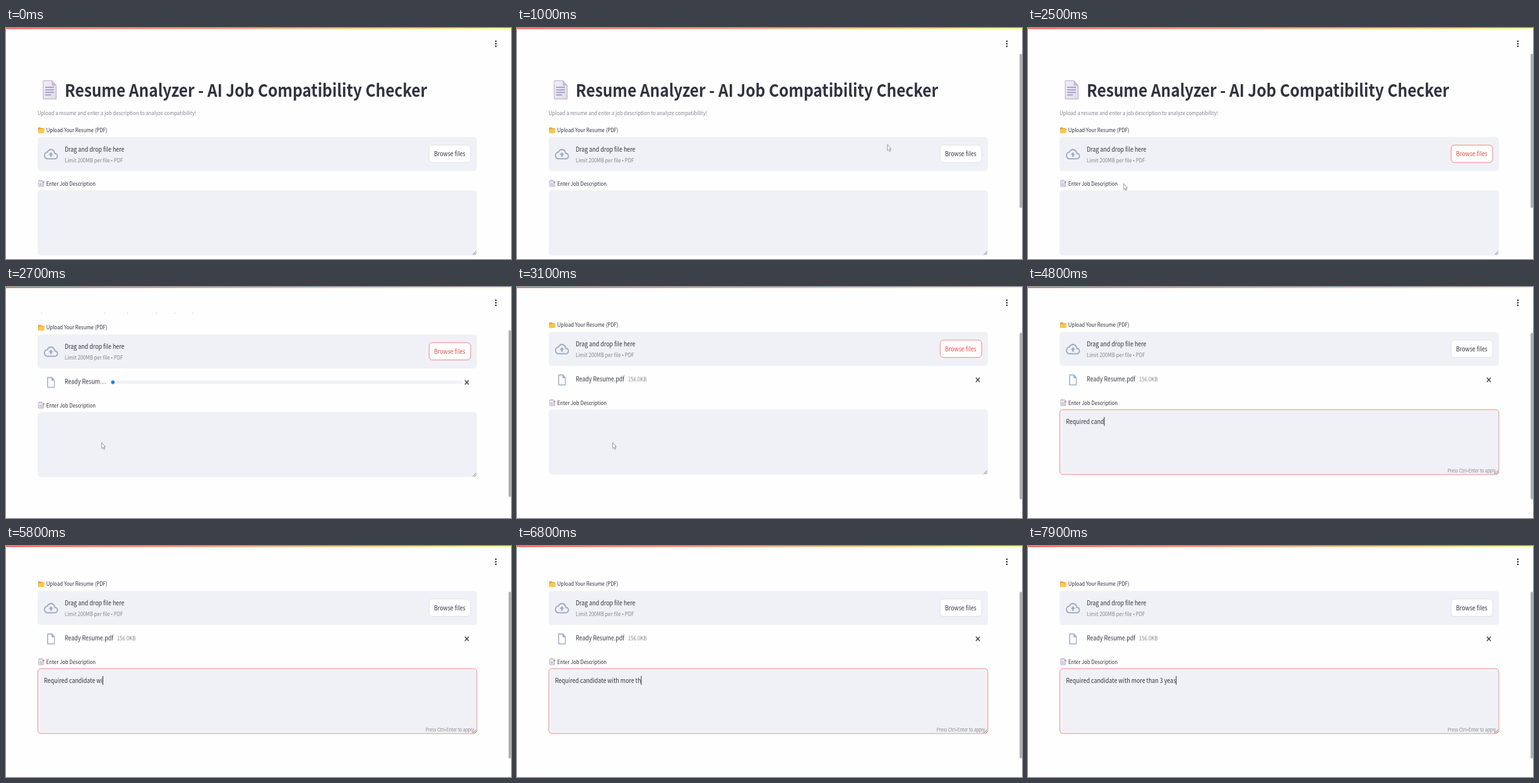
An HTML page that plays this animation: 800 px wide and 366 px high, repeating every 8000 ms.

```html
<!DOCTYPE html>
<html lang="en">
<head>
<meta charset="utf-8">
<title>Resume Analyzer</title>
<style>
  html, body { margin: 0; width: 100%; height: 100%; overflow: hidden; background: #fefefe; }
  svg { display: block; width: 800px; height: 366px; }

  /* The page is shown at 62.2% of its width and 69.5% of its height. */
  text {
    scale: .622 .695;
    font: 14.32px "Noto Sans CJK JP", "Noto Sans CJK SC", "Noto Sans CJK", "Noto Sans", sans-serif;
    fill: #31333f;
    white-space: pre;
  }
  .title { font-size: 39.4px; font-weight: 700; }
  .label { font-size: 12.53px; }
  .muted { font-size: 12.53px; fill: #85868e; }
  .hint { font-size: 10.74px; fill: #85868e; }

  .panel { fill: #f0f1f6; }
  .icon { fill: #9eadc6; }
  .button rect { fill: #fff; stroke: #d8d8dc; stroke-width: .7; }

  .scroll, .lower, .bar, .file, .progress, .done, .button rect, .button text,
  .focus, .caret, .hint, .pointer { animation: 8s step-end infinite; }

  .scroll { animation-name: scroll; }
  @keyframes scroll {
    0% { transform: translateY(0); }
    32.5% { transform: translateY(-71px); }
    33.75% { transform: translateY(-97.5px); }
    35%, 100% { transform: translateY(-101.5px); }
  }
  .lower { animation-name: push; }
  @keyframes push {
    0% { transform: translateY(0); }
    32.5%, 100% { transform: translateY(38.5px); }
  }
  .bar { animation-name: bar; }
  @keyframes bar {
    0% { opacity: 0; y: 41px; height: 244px; }
    1.25% { opacity: 1; y: 41px; height: 244px; }
    32.5% { opacity: 1; y: 61px; height: 264px; }
    33.75% { opacity: 1; y: 68.5px; height: 264px; }
    35%, 100% { opacity: 1; y: 72.5px; height: 264px; }
  }
  .file { animation-name: file; }
  @keyframes file { 0% { opacity: 0; } 32.5%, 100% { opacity: 1; } }
  .progress { animation-name: progress; }
  @keyframes progress { 0% { opacity: 1; } 35%, 100% { opacity: 0; } }
  .done { animation-name: done; }
  @keyframes done { 0% { opacity: 0; } 35%, 100% { opacity: 1; } }

  .button rect { animation-name: hot-edge; }
  @keyframes hot-edge { 15% { stroke: #ff4b4b; } 41.25% { stroke: #d8d8dc; } 0%, 100% { stroke: #d8d8dc; } }
  .button text { animation-name: hot-text; }
  @keyframes hot-text { 15% { fill: #f04848; } 41.25% { fill: #31333f; } 0%, 100% { fill: #31333f; } }

  .focus, .caret { animation-name: focus; }
  @keyframes focus { 0% { opacity: 0; } 41.25%, 100% { opacity: 1; } }
  .hint { animation-name: hint; }
  @keyframes hint { 0% { opacity: 0; } 45%, 100% { opacity: 1; } }

  .pointer { animation-name: pointer, pointer-seen; }
  @keyframes pointer {
    0% { transform: translate(668px, 31px); animation-timing-function: steps(5); }
    6.25% { transform: translate(527px, 176px); }
    11.25% { transform: translate(527px, 176px); animation-timing-function: steps(3); }
    15% { transform: translate(705px, 201px); }
    16.25% { transform: translate(705px, 201px); animation-timing-function: steps(9); }
    27.5% { transform: translate(200px, 150px); animation-timing-function: steps(3); }
    31.25%, 100% { transform: translate(151px, 246px); }
  }
  @keyframes pointer-seen { 0% { opacity: 0; } 1.25% { opacity: 1; } 40%, 100% { opacity: 0; } }
</style>
</head>
<body>
<svg viewBox="0 0 800 366">
  <defs>
    <linearGradient id="rainbow"><stop stop-color="#ff4b4b"/><stop offset="1" stop-color="#fffd80"/></linearGradient>
    <linearGradient id="paper" x2="1" y2="1"><stop stop-color="#f3eef7"/><stop offset="1" stop-color="#dfd9ea"/></linearGradient>
    <clipPath id="view"><path d="M0 40.8H800V366H0z"/></clipPath>
  </defs>

  <g clip-path="url(#view)">
    <g class="scroll">
      <g stroke-linejoin="round">
        <path d="M59 83.5H73L79.5 91V112.5H59z" fill="url(#paper)" stroke="#b9aec9"/>
        <path d="M73 83.5V91H79.5z" fill="#cbbfd9" stroke="#b9aec9" stroke-width=".7"/>
        <path d="M62 94H76M62 98H76M62 102H76M62 106H71" stroke="#8d93b8" stroke-width="1.3"/>
      </g>
      <text class="title" style="translate:93px 108.6px">Resume Analyzer - AI Job Compatibility Checker</text>
      <text class="muted" style="translate:50px 137.7px">Upload a resume and enter a job description to analyze compatibility!</text>

      <path d="M51 158.4q0-1 1-1h2.8l1.2 1.3h3.3q.9 0 .9.9v6.9H51z" fill="#e5a32d"/>
      <path d="M51 166.2l1-5.6q.1-.6.8-.6h7.6q.8 0 .7.7l-.8 5q-.1.8-.9.8h-7.6q-.8 0-.8-.3z" fill="#fbc84c"/>
      <text class="label" style="translate:63.7px 164.8px">Upload Your Resume (PDF)</text>

      <rect class="panel" x="50" y="172.7" width="696" height="53.9" rx="5" ry="5.5"/>
      <path class="icon" transform="translate(60 187.4) scale(.933 1.042)" d="M19.35 10.04A7.49 7.49 0 0 0 12 4C9.11 4 6.6 5.64 5.35 8.04A5.994 5.994 0 0 0 0 14c0 3.31 2.69 6 6 6h13c2.76 0 5-2.24 5-5 0-2.64-2.05-4.78-4.65-4.96zM19 18H6c-2.21 0-4-1.79-4-4 0-2.05 1.53-3.76 3.56-3.97l1.07-.11.5-.95A5.469 5.469 0 0 1 12 6c2.62 0 4.88 1.86 5.39 4.43l.3 1.5 1.53.11A2.98 2.98 0 0 1 22 15c0 1.65-1.35 3-3 3zM8 13h2.55v3h2.9v-3H16l-4-4-4 4z"/>
      <text style="translate:93px 195.8px">Drag and drop file here</text>
      <text class="muted" style="translate:93px 212.9px">Limit 200MB per file • PDF</text>
      <g class="button">
        <rect x="670.3" y="185.6" width="65.7" height="27.5" rx="5" ry="5.5"/>
        <text style="translate:678px 203.2px">Browse files</text>
      </g>

      <g class="file">
        <path class="icon" transform="translate(62 238.2) scale(.777 .87)" d="M14 2H6C4.9 2 4 2.9 4 4v16c0 1.1.89 2 1.99 2H18c1.1 0 2-.9 2-2V8l-6-6zM6 20V4h7v5h5v11H6z"/>
        <g class="progress">
          <text style="translate:93px 251px">Ready Resum…</text>
          <rect x="166" y="245.7" width="556.5" height="5.4" rx="2.7" fill="#f0f1f6"/>
          <circle cx="169.3" cy="248.4" r="2.8" fill="#1c83e1"/>
        </g>
        <g class="done">
          <text style="translate:93px 251px">Ready Resume.pdf</text>
          <text class="muted" style="translate:175.8px 251px">156.0KB</text>
        </g>
        <path d="M726.9 245.2l6.2 6.8M733.1 245.2l-6.2 6.8" stroke="#31333f" stroke-width="1.3"/>
      </g>

      <g class="lower">
        <path d="M52.4 241.2h5.2l2 2.2v7.6h-7.2z" fill="#e4deec" stroke="#a89fba" stroke-width=".6"/>
        <path d="M51.4 242.6h5l1.8 2v6.4h-6.8z" fill="#f1edf6" stroke="#a89fba" stroke-width=".6"/>
        <path d="M52.6 246h3.8M52.6 247.6h4.2M52.6 249.2h4.2" stroke="#8d93b8" stroke-width=".6"/>
        <path d="M58.6 243.4h1.9v2h-1.9z" fill="#e0564f"/>
        <text class="label" style="translate:63.7px 249.6px">Enter Job Description</text>

        <rect class="panel" x="50" y="257" width="696" height="103.3" rx="5" ry="5.5"/>
        <rect class="focus" x="50.3" y="257.2" width="695.6" height="103" rx="5" ry="5.5" fill="none" stroke="#f57676" stroke-width=".8"/>
        <text id="typed" style="translate:60.3px 279.6px"></text>
        <rect class="caret" id="caret" y="269" width="1" height="14" fill="#31333f"/>
        <text class="hint" style="translate:664.8px 356.6px">Press Ctrl+Enter to apply</text>
        <path d="M739.5 359.3l5.3-5.6M742.4 359.5l2.5-2.7" stroke="#55565c" stroke-width=".8"/>
      </g>
    </g>
  </g>

  <rect width="800" height="1.5" fill="url(#rainbow)"/>
  <g fill="#31333f"><circle cx="776" cy="21" r="1.35"/><circle cx="776" cy="25" r="1.35"/><circle cx="776" cy="29" r="1.35"/></g>
  <rect class="bar" x="796.2" y="41" width="3.8" height="244" rx="1.6" fill="#b0b0b1"/>
  <path class="pointer" d="M.4.4V9.8L2.4 8 4 11.3 5.5 10.6 4 7.4H6.5z" fill="#fff" stroke="#77777c" stroke-width=".8" stroke-linejoin="round"/>
</svg>
<script>
  const LOOP = 8000, TICK = 100, TEXT_X = 60.3, SCALE_X = .622;
  const message = "Required candidate with more than 3 yeas";
  // [time in ms, characters typed]
  const pace = [[3500, 0], [4800, 13], [5800, 21], [6000, 23], [6100, 23], [7000, 34], [7100, 34], [7700, 40]];
  const typed = document.getElementById("typed");
  const caret = document.getElementById("caret");
  let start, shown = -1;

  function typedCount(time) {
    const next = pace.findIndex(([at]) => at > time);
    if (next === 0) return 0;
    if (next < 0) return message.length;
    const [t0, n0] = pace[next - 1], [t1, n1] = pace[next];
    return Math.floor(n0 + (n1 - n0) * (time - t0) / (t1 - t0) + 1e-6);
  }

  function draw(now) {
    start ??= now;
    const time = Math.floor((now - start) % LOOP / TICK) * TICK;
    const count = typedCount(time);
    if (count !== shown) {
      shown = count;
      typed.textContent = message.slice(0, count);
      const width = count ? typed.getComputedTextLength() : 0;
      caret.setAttribute("x", TEXT_X + width * SCALE_X);
    }
    requestAnimationFrame(draw);
  }
  requestAnimationFrame(draw);
</script>
</body>
</html>
```
